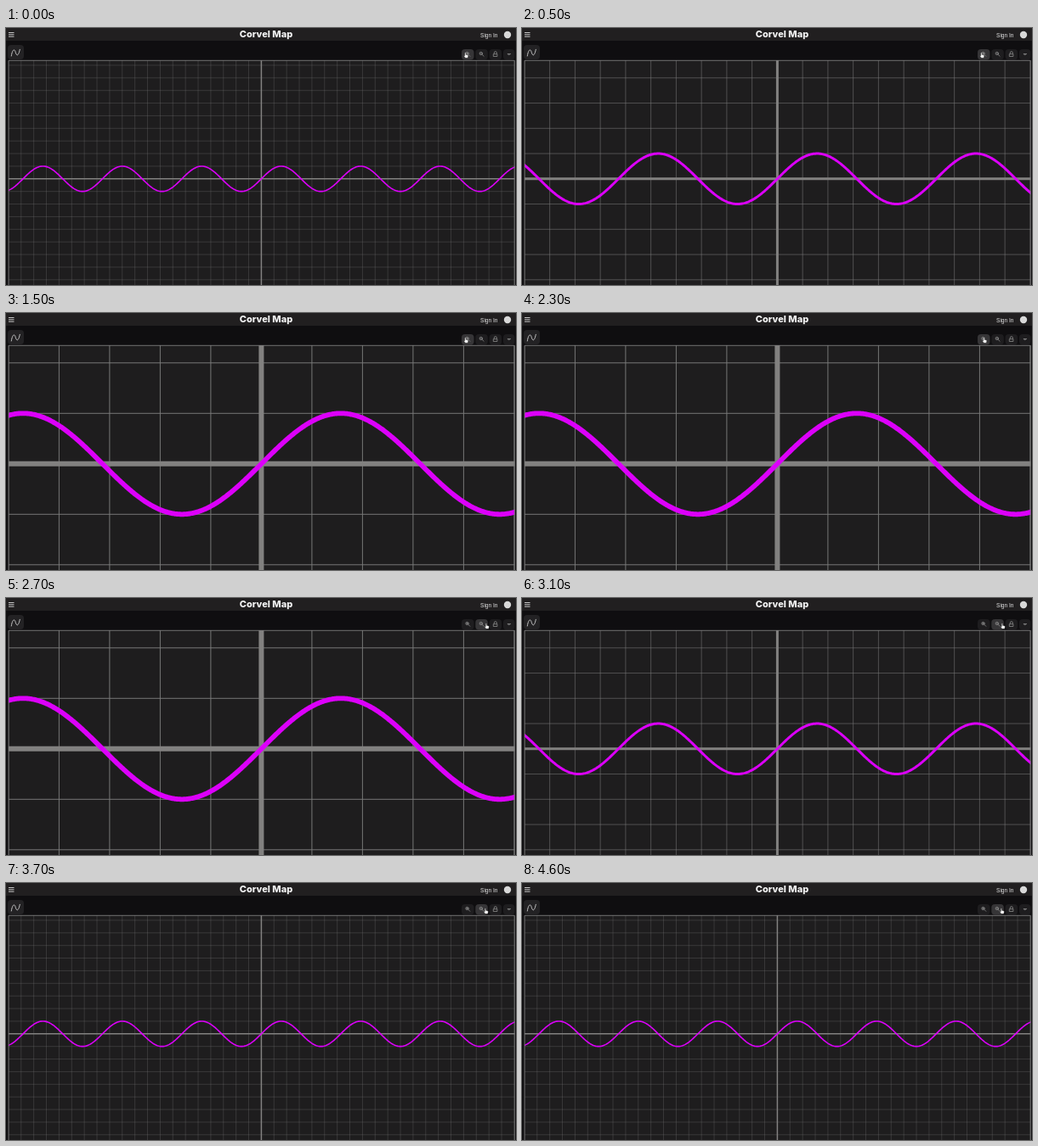
These frames come from a looping animation (600 by 303 pixels, 4800 ms). An HTML page:

```html
<!DOCTYPE html>
<html lang="en">
<head>
<meta charset="utf-8">
<title>Corvel Map</title>
<style>
  html, body { margin: 0; width: 100%; height: 100%; overflow: hidden; background: #0f0e10; }
  svg { display: block; width: 100vw; height: 100vh; }
  .title { font: 800 11px Inter, sans-serif; fill: #f4f4f4; text-anchor: middle; }
  .sign { font: 6.6px "Liberation Sans", Arial, sans-serif; fill: #e4e4e4; }
  .line { fill: none; stroke-linecap: round; }
  .button { fill: #1e1d1f; }
  .button.on { fill: #363537; }
</style>
</head>
<body>
<svg viewBox="0 0 600 303">
  <defs>
    <clipPath id="plot"><rect x="3" y="38" width="595.5" height="270"/></clipPath>
  </defs>
  <rect width="600" height="303" fill="#0f0e10"/>
  <rect width="600" height="15" fill="#211f20"/>
  <path class="line" d="M3 5.5h6.5M3 7.8h6.5M3 10.1h6.5" stroke="#c8c8c8" style="stroke-linecap:butt"/>
  <text class="title" x="306" y="11">Corvel Map</text>
  <text class="sign" x="558" y="10.6">Sign In</text>
  <circle cx="590" cy="8" r="4.2" fill="#d8d8d8"/>

  <rect x="2" y="20" width="19" height="17" rx="4" fill="#232224"/>
  <path class="line" d="M6.3 33C7.5 25 10 24 11.2 28.5S14.5 34 16.3 25.3" stroke="#c4c4c4"/>

  <g id="buttons">
    <rect class="button" x="536" y="25" width="14.5" height="12.5" rx="4"/>
    <rect class="button" x="552.3" y="25" width="14.5" height="12.5" rx="4"/>
    <rect class="button" x="568.6" y="25" width="14.5" height="12.5" rx="4"/>
    <rect class="button" x="585" y="25" width="13.5" height="12.5" rx="4"/>
  </g>
  <g class="line" stroke="#8c8c8c" stroke-width=".8">
    <circle cx="542.5" cy="30" r="1.7"/>
    <path d="M543.8 31.3l2 2M541.8 30h1.4M542.5 29.3v1.4"/>
    <circle cx="558.8" cy="30" r="1.7"/>
    <path d="M560.1 31.3l2 2M558.1 30h1.4"/>
    <path d="M574.3 30.5v-1.3a1.5 1.5 0 0 1 3 0v1.3M573.7 30.7h4.2v2.8h-4.2z"/>
    <path d="M590.3 30.5h3.4l-1.7 1z"/>
  </g>

  <g clip-path="url(#plot)">
    <rect x="3" y="38" width="596" height="265" fill="#1e1d1e"/>
    <path id="grid" class="line" stroke="#7c7c7c"/>
    <path id="axes" class="line" stroke="#828180"/>
    <path id="curve" class="line" stroke="#dc00fa"/>
  </g>
  <path class="line" d="M3 310V38.3H598.3V310" stroke="#7b7b7b" stroke-width=".9"/>
  <path id="hand" fill="#fff" stroke="#222" stroke-width=".4"
    d="M-1.2-2.8q.7-.7 1.2.1v2l2.3.6q.7.3.5 1.2l-.5 2.2h-3l-1.7-2.4q.2-.8 1.2-.1z"/>
</svg>
<script>
const LOOP = 4800, UNIT = 14.875, CX = 300.4, CY = 177.8;
const byId = id => document.getElementById(id);
const buttons = byId('buttons').children;

// [start ms, value]
const zoomSteps = [[0, 1], [300, 2], [1500, 4], [3100, 2], [3700, 1]];
const handSteps = [[0, [541, 32]], [2300, [544, 32]], [2400, [549, 32]], [2500, [555, 32.5]],
  [2600, [561, 33]], [2700, [565.5, 33]], [3500, [564.5, 33]]];
const valueAt = (steps, t) => steps.filter(([start]) => start <= t).pop()[1];

function setLine(id, d, width) {
  byId(id).setAttribute('d', d);
  byId(id).setAttribute('stroke-width', width);
}

function drawPlot(zoom) {
  const unit = UNIT * zoom;
  let grid = '', curve = '';
  for (let i = -20; i <= 20; i++) {
    if (i) grid += `M${CX + i * unit} 38V303M3 ${CY + i * unit}H599`;
  }
  for (let x = 2; x <= 600; x++) {
    const y = CY - unit * Math.sin((x - CX) / unit);
    curve += `${curve ? 'L' : 'M'}${x} ${y.toFixed(2)}`;
  }
  setLine('grid', grid, [0, 0.3, 0.55, 0, 0.95][zoom]);
  setLine('axes', `M${CX} 38V303M3 ${CY}H599`, 1.5 * zoom);
  setLine('curve', curve, 0.2 + 1.4 * zoom);
}

let shownZoom;
function render(now) {
  const t = now % LOOP;
  const zoom = valueAt(zoomSteps, t);
  if (zoom !== shownZoom) drawPlot(shownZoom = zoom);
  const [x, y] = valueAt(handSteps, t);
  byId('hand').setAttribute('transform', `translate(${x} ${y})`);
  buttons[0].classList.toggle('on', x < 551);
  buttons[1].classList.toggle('on', x > 551);
}

const start = performance.now();
function tick() {
  render(performance.now() - start);
  requestAnimationFrame(tick);
}
tick();
</script>
</body>
</html>
```
